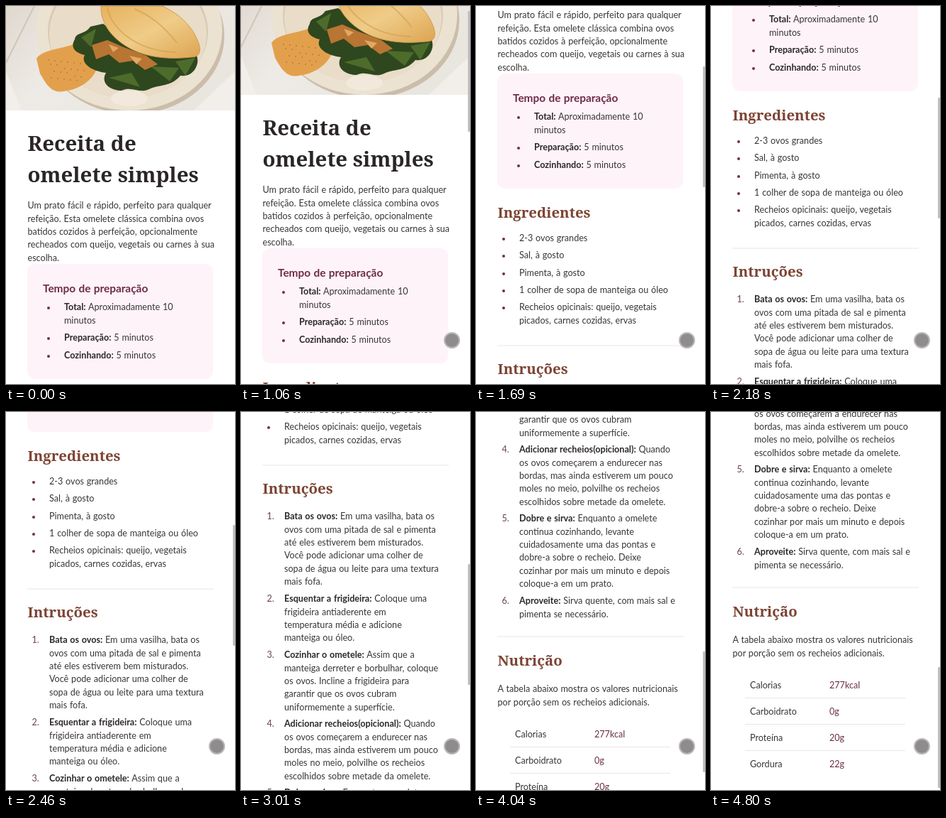
Write an HTML page that moves like this. It is 323 px wide and 532 px high and loops after 5070 ms.

```html
<!DOCTYPE html>
<html lang="pt-BR">
<head>
<meta charset="utf-8">
<title>Receita de omelete simples</title>
<style>
  html, body { margin: 0; width: 100%; height: 100%; overflow: hidden; background: #fff; }
  svg { display: block; width: 100%; height: 100%; }
  text { font: 12.6px Lato, "Open Sans", sans-serif; word-spacing: .6px; fill: #393435; }
  .b { font-weight: 700; fill: #2c2729; }
  .h1, .h2 { font-family: "Noto Serif", serif; font-weight: 700; word-spacing: 0; }
  .h1 { font-size: 29.4px; fill: #2b2626; }
  .h2 { font-size: 20.4px; fill: #7d4433; }
  .h3 { font-size: 15.4px; font-weight: 700; fill: #6f2b48; }
  .num { fill: #6b4350; }
  .val { fill: #6a2f48; }
  .dot { fill: #722d4a; }
  .rule { fill: #e9e6e5; }
</style>
</head>
<body>
<svg viewBox="0 0 323 532" preserveAspectRatio="none">
  <defs>
    <clipPath id="frame"><path d="M0 0H323V147H0z"/></clipPath>
    <linearGradient id="marble" x2="1" y2=".4">
      <stop stop-color="#dfd8cf"/><stop offset=".4" stop-color="#eeebe6"/><stop offset="1" stop-color="#e9e5df"/>
    </linearGradient>
    <linearGradient id="egg" x2="1" y2="1">
      <stop stop-color="#e6b25f"/><stop offset=".5" stop-color="#efcc88"/><stop offset="1" stop-color="#dda452"/>
    </linearGradient>
  </defs>
  <g id="page">
    <g clip-path="url(#frame)">
      <path fill="url(#marble)" d="M0 0H323V147H0z"/>
      <path fill="#f2eee9" d="M0 92L22 147H0zM265 147L323 92V147z"/>
      <path d="M40 0L0 80" stroke="#cfc6bb" stroke-width="2"/>
      <ellipse cx="178" cy="42" rx="130" ry="110" fill="#cbbda9"/>
      <ellipse cx="174" cy="34" rx="131" ry="113" fill="#ece2d2"/>
      <ellipse cx="172" cy="36" rx="113" ry="92" fill="#d9cab4"/>
      <ellipse cx="172" cy="39" rx="111" ry="91" fill="#e9dcc8"/>
      <ellipse cx="174" cy="130" rx="26" ry="11" fill="#f2e9dc"/>
      <path fill="#e3a04c" d="M43 74C52 60 82 61 102 51L128 88C122 105 104 117 82 120C62 124 55 106 48 95z"/>
      <g id="specks"></g>
      <path fill="#2f471e" d="M97 47C99 36 111 41 119 29L137 25L177 55L239 70L269 70C274 82 264 101 246 98C233 114 217 110 202 117C188 124 178 112 163 119C146 119 133 108 141 94C119 91 105 80 111 69C95 65 91 57 97 47z"/>
      <path fill="#4d6b2b" d="M106 44L127 32L120 58zM145 101L177 94L189 114zM204 85L231 106L244 87zM239 78L267 73L253 98z"/>
      <path fill="#b87533" d="M121 55L143 48L166 58L198 70L214 82L196 90L179 77L160 80L145 68L127 75z"/>
      <path fill="#e2a762" d="M145 54L159 59L151 65zM174 70L192 74L184 82z"/>
      <path fill="url(#egg)" stroke="#d39b4c" d="M134 0C133 23 148 44 172 58C199 74 234 75 261 72C275 72 276 61 270 48C262 27 241 9 220 0z"/>
      <path d="M143 0C145 29 183 64 240 65M181 4C205 14 222 28 241 52" fill="none" stroke="#d59e50" stroke-width="2" opacity=".65"/>
    </g>
    <rect x="30" y="363" width="262" height="162" rx="11" fill="#fef3f9"/>
  </g>
  <rect id="thumb" x="320" width="3" height="170" rx="1" fill="#c1bfc3"/>
  <circle id="cursor" r="10.5" fill="#8f8c8e" stroke="#bbb8ba" stroke-width="2"/>
</svg>
<script>
const byId = id => document.getElementById(id);
const page = byId('page'), thumb = byId('thumb'), cursor = byId('cursor');
const LEADING = 18.3;

const add = markup => page.insertAdjacentHTML('beforeend', markup);
const bold = s => s.replace(/\*(.+?)\*/g, '<tspan class="b">$1</tspan>');
const line = (x, y, s, cls = '') => add(`<text x="${x}" y="${y}" class="${cls}">${bold(s)}</text>`);
const block = (x, y, s) => s.split('|').forEach((part, i) => line(x, y + 4.3 + i * LEADING, part));
const rule = (x, y, w) => add(`<rect class="rule" x="${x}" y="${y}" width="${w}" height="1"/>`);
const bullet = (x, y, indent, s) => {
  add(`<circle class="dot" cx="${x}" cy="${y + 1}" r="2"/>`);
  block(x + indent, y, s);
};

line(30.5, 204, 'Receita de', 'h1');
line(30.5, 248, 'omelete simples', 'h1');
block(30.5, 281, 'Um prato fácil e rápido, perfeito para qualquer|refeição. Esta omelete clássica combina ovos|batidos cozidos à perfeição, opcionalmente|recheados com queijo, vegetais ou carnes à sua|escolha.');

line(52, 403, 'Tempo de preparação', 'h3');
bullet(60, 424, 22, '*Total:* Aproximadamente 10|minutos');
bullet(60, 467, 22, '*Preparação:* 5 minutos');
bullet(60, 492, 22, '*Cozinhando:* 5 minutos');

line(30.5, 566, 'Ingredientes', 'h2');
['2-3 ovos grandes', 'Sal, à gosto', 'Pimenta, à gosto', '1 colher de sopa de manteiga ou óleo',
 'Recheios opicinais: queijo, vegetais|picados, carnes cozidas, ervas']
  .forEach((s, i) => bullet(39, Math.round(595 + i * 24.3), 22, s));
rule(30, 745.5, 263);

line(30.5, 786, 'Intruções', 'h2');
[[818, '*Bata os ovos:* Em uma vasilha, bata os|ovos com uma pitada de sal e pimenta|até eles estiverem bem misturados.|Você pode adicionar uma colher de|sopa de água ou leite para uma textura|mais fofa.'],
 [934, '*Esquentar a frigideira:* Coloque uma|frigideira antiaderente em|temperatura média e adicione|manteiga ou óleo.'],
 [1013, '*Cozinhar o ometele:* Assim que a|manteiga derreter e borbulhar, coloque|os ovos. Incline a frigideira para|garantir que os ovos cubram|uniformemente a superfície.'],
 [1110, '*Adicionar recheios(opicional):* Quando|os ovos começarem a endurecer nas|bordas, mas ainda estiverem um pouco|moles no meio, polvilhe os recheios|escolhidos sobre metade da omelete.'],
 [1207, '*Dobre e sirva:* Enquanto a omelete|continua cozinhando, levante|cuidadosamente uma das pontas e|dobre-a sobre o recheio. Deixe|cozinhar por mais um minuto e depois|coloque-a em um prato.'],
 [1323, '*Aproveite:* Sirva quente, com mais sal e|pimenta se necessário.']]
  .forEach(([y, s], i) => {
    line(36.5, y + 4.3, `${i + 1}.`, 'num');
    block(61, y, s);
  });
rule(30, 1372.5, 263);

line(30.5, 1414, 'Nutrição', 'h2');
block(30.5, 1447, 'A tabela abaixo mostra os valores nutricionais|por porção sem os recheios adicionais.');
[['Calorias', '277kcal'], ['Carboidrato', '0g'], ['Proteína', '20g'], ['Gordura', '22g']]
  .forEach(([label, value], i) => {
    const y = 1511 + i * 37;
    if (i) rule(48, y - 20, 226);
    block(55, y, label);
    line(167, y + 4.3, value, 'val');
  });

// Pepper on the sauce
byId('specks').innerHTML = Array.from({ length: 22 }, (_, i) =>
  `<circle cx="${60 + i * 37 % 51}" cy="${76 + i * 23 % 34}" r=".8" fill="#9c622d"/>`).join('');

const LOOP = 5070;
// Bursts of picture updates: first, last, count
const bursts = [[460, 660, 4], [1060, 2460, 21], [2790, 3360, 9], [3760, 4320, 9], [4730, 4800, 2]];
// Flicks of the page: start, duration, distance
const flicks = [[970, 900, 270], [1937, 680, 230], [2759, 720, 309.3], [3690, 580, 270.5], [4690, 696, 257]];

const clamp = v => Math.min(1, Math.max(0, v));
const glide = u => 1 - (1 - u) ** 4 * (1 + 4 * u);

function lastTick(t) {
  let tick = 0;
  for (const [first, last, count] of bursts) {
    if (t < first) break;
    const gap = (last - first) / (count - 1);
    tick = first + Math.min(count - 1, Math.floor((t - first) / gap + 1e-6)) * gap;
  }
  return tick;
}

function draw(now) {
  const t = lastTick(now % LOOP);
  const scroll = t < 1060 ? 0 : Math.round(flicks.reduce(
    (sum, [start, time, distance]) => sum + distance * glide(clamp((t - start) / time)), 0));
  page.setAttribute('transform', `translate(0 ${-scroll})`);
  thumb.setAttribute('y', Math.round(scroll * .319));
  thumb.style.display = t < 1060 ? 'none' : '';

  const away = (1 - clamp((t - 460) / 200)) ** 2;
  cursor.setAttribute('cx', 297.5 + 11 * away);
  cursor.setAttribute('cy', 470.5 + 49 * away);
  cursor.style.display = t < 460 ? 'none' : '';
}

const origin = performance.now();
function loop() {
  draw(performance.now() - origin);
  requestAnimationFrame(loop);
}
loop();
</script>
</body>
</html>
```
